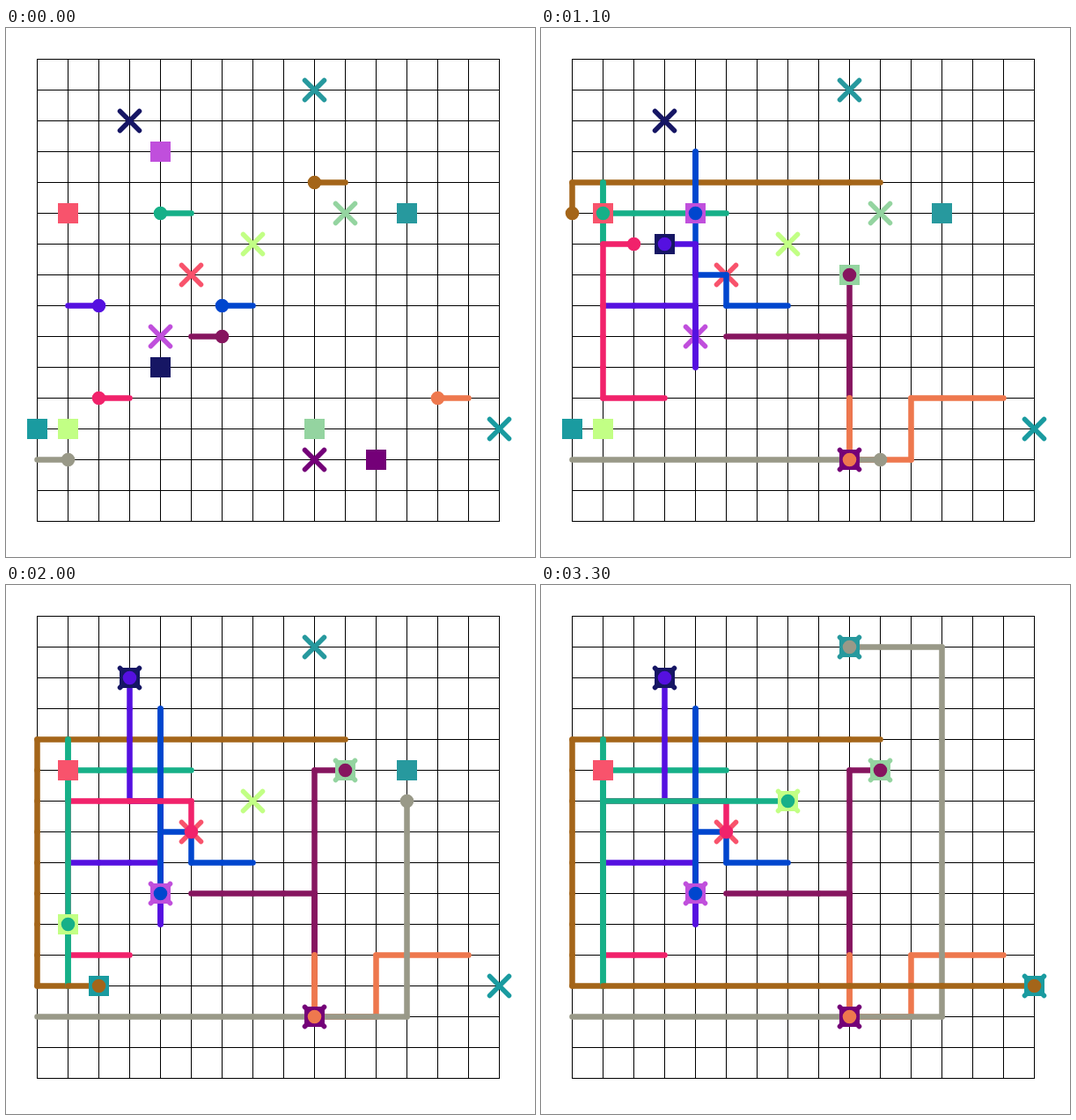
An HTML page with a canvas for the animation above (3400 ms loop, 601 by 601 pixels).

```html
<!DOCTYPE html>
<html lang="en">
<head>
<meta charset="utf-8">
<title>Robots on a grid</title>
<style>
html, body { margin: 0; width: 100%; height: 100%; overflow: hidden; background: #fff; }
canvas { display: block; }
</style>
</head>
<body>
<canvas id="stage" width="601" height="601"></canvas>
<script>
const ctx = document.getElementById('stage').getContext('2d');
const CELL = 35, CELLS = 15, STEP = 100, STEPS = 34;
const DIRS = { L: [-1, 0], R: [1, 0], U: [0, -1], D: [0, 1], '.': [0, 0] };
const px = n => (n + 1) * CELL + 0.5;

// Routes: direction and optional count; a dot is a wait.
function walk([x, y], route) {
  const path = [[x, y]];
  for (const [, dir, count] of route.matchAll(/([LRUD.])(\d*)/g)) {
    for (let i = 0; i < (+count || 1); i++) {
      x += DIRS[dir][0];
      y += DIRS[dir][1];
      path.push([x, y]);
    }
  }
  while (path.length <= STEPS) path.push([x, y]);
  return path;
}

function robot(color, start, route, cargoColor, cargo) {
  const path = walk(start, route);
  const pickup = path.findIndex(([x, y]) => x === cargo[0] && y === cargo[1]);
  return { color, path, cargoColor, cargo, pickup, goal: path[STEPS] };
}

const robots = [
  robot('#a46519', [10, 4], 'L10.D8R15', '#1a9ba0', [0, 12]),
  robot('#16b088', [5, 5], 'L4DU.3U.D8U6R6', '#c2ff85', [1, 12]),
  robot('#0046ce', [7, 8], 'L2ULU4D2.2D4', '#c04fdc', [4, 3]),
  robot('#5510e0', [1, 8], 'R3D2.U4.LU4', '#161664', [4, 10]),
  robot('#86155f', [5, 9], 'R4D3U7R', '#94d4a0', [9, 12]),
  robot('#f1226b', [3, 11], 'L2U3.U2.3R4D', '#f8536c', [1, 5]),
  robot('#ee784e', [14, 11], 'L3D2L2.U2D2', '#740078', [11, 13]),
  robot('#999988', [0, 13], 'R8.2R4U12L3', '#27999e', [12, 5])
];

function line(x1, y1, x2, y2, color, width) {
  ctx.strokeStyle = color;
  ctx.lineWidth = width;
  ctx.beginPath();
  ctx.moveTo(x1, y1);
  ctx.lineTo(x2, y2);
  ctx.stroke();
}

function drawGrid() {
  ctx.lineCap = 'square';
  const a = px(0), b = px(CELLS);
  for (let i = 0; i <= CELLS; i++) {
    line(px(i), a, px(i), b, '#000', 1);
    line(a, px(i), b, px(i), '#000', 1);
  }
}

function drawGoal({ goal, cargoColor }) {
  const x = px(goal[0]), y = px(goal[1]), r = 11;
  line(x - r, y - r, x + r, y + r, cargoColor, 5.5);
  line(x - r, y + r, x + r, y - r, cargoColor, 5.5);
}

function drawMove({ path, color }, i) {
  const [x1, y1] = path[i - 1], [x2, y2] = path[i];
  if (x1 !== x2 || y1 !== y2) line(px(x1), px(y1), px(x2), px(y2), color, 6.5);
}

function drawCargo({ path, cargo, cargoColor, pickup }, moves) {
  const [x, y] = pickup >= 0 && moves >= pickup ? path[moves] : cargo;
  ctx.fillStyle = cargoColor;
  ctx.fillRect(px(x) - 11.5, px(y) - 11.5, 23, 23);
}

function drawHead({ path, color }, moves) {
  const [x, y] = path[moves];
  ctx.fillStyle = color;
  ctx.beginPath();
  ctx.arc(px(x), px(y), 7.8, 0, 2 * Math.PI);
  ctx.fill();
}

function draw(moves) {
  ctx.fillStyle = '#fff';
  ctx.fillRect(0, 0, 601, 601);
  drawGrid();
  ctx.lineCap = 'round';
  robots.forEach(drawGoal);
  // Later moves cover earlier ones.
  for (let i = 1; i <= moves; i++) robots.forEach(r => drawMove(r, i));
  robots.forEach(r => drawCargo(r, moves));
  robots.forEach(r => drawHead(r, moves));
}

const begin = performance.now();
function tick() {
  const t = Math.max(0, performance.now() - begin);
  draw(Math.floor(t / STEP) % STEPS + 1);
  requestAnimationFrame(tick);
}
tick();
</script>
</body>
</html>
```
